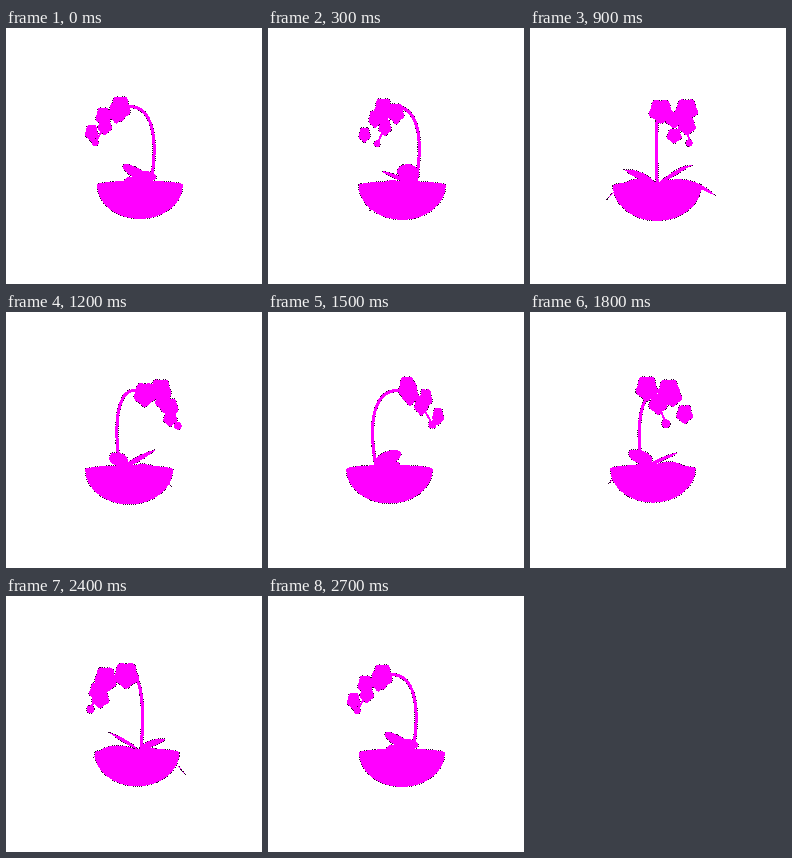
Recreate the animation shown at these times as an HTML page. Size 256 px wide and 256 px high, loop 3 s.

```html
<!DOCTYPE html>
<html lang="en">
<head>
<meta charset="utf-8">
<title>Turning orchid</title>
<style>
html, body { margin: 0; width: 100%; height: 100%; overflow: hidden; background: #fff; }
svg { display: block; width: 100vw; height: 100vh; shape-rendering: crispEdges; }
#edge { fill: none; stroke: #303; stroke-width: 1; stroke-dasharray: 1 1; }
#body { fill: #f0f; }
.stem { fill: none; stroke: #f0f; stroke-width: 3; }
.twig { fill: none; stroke: #f0f; stroke-width: 2; }
#edge .stem { stroke: #303; stroke-width: 3.6; }
</style>
</head>
<body>
<svg viewBox="0 0 256 256"><g id="edge"></g><g id="body"></g></svg>
<script>
const STEP = 300, STEPS = 10, TURN = 40, PHASE = -22;
const MID = 128, EYE = 300;

// Points are [along the arch, sideways, down] from the middle of the stage.
const stemCurve = [[20, 2, 26], [30, 2, -30], [17, 2, -56], [-12, 1, -48]];
const blossoms = [
  { at: [-14, 1, -47], size: 12 },
  { at: [-9, 28, -47], size: 11 },
  { at: [-28, 14, -40], size: 9 },
  { at: [-22, 28, -32], size: 9 },
  { at: [-40, 13, -23], size: 8 }
];
const bud = [-32, 30, -14];
const leaves = [
  { tip: [2, -34, 14], wide: 14 },
  { tip: [6, 34, 9], wide: 16 },
  { tip: [-5, -55, 46], wide: 8 },
  { tip: [10, 57, 38], wide: 8 }
];
const leafRoot = [10, 0, 27];

let cos, sin;

function project([r, s, h]) {
  const k = EYE / (EYE - r * sin + s * cos);
  return { x: MID + k * (r * cos + s * sin), y: MID + k * h, k };
}

function pt(p) {
  const { x, y } = project(p);
  return x.toFixed(2) + " " + y.toFixed(2);
}

const path = (d, cls = "") => `<path class="${cls}" d="${d}"/>`;

function bowl() {
  const { x, k } = project([6.5, 0, 0]);
  const w = 43.3 * k, left = x - w, right = x + w, rim = MID + 29 * k;
  return path(`M${left} ${rim}A${w} ${34.5 * k} 0 0 0 ${right} ${rim}A${w} ${4 * k} 0 0 0 ${left} ${rim}Z`);
}

function leaf({ tip: [r, s, h], wide }) {
  const side = m => [
    [leafRoot[0] + m * wide, s * 0.3, 22 + m * 3],
    [r + m * wide, s * 0.7, Math.min(h + 2, 24) + m * 3]
  ].map(pt);
  const [a, b] = side(-1), [c, d] = side(1);
  return path(`M${pt(leafRoot)}C${a},${b},${pt([r, s, h])}C${d},${c},${pt(leafRoot)}Z`);
}

// A five-lobed disc, narrower when it is seen from the side.
function blossom({ at, size }) {
  const { x, y, k } = project(at), flat = 0.65 + 0.35 * Math.abs(sin);
  const points = Array.from({ length: 30 }, (_, i) => {
    const a = i * Math.PI / 15, r = size * k * (1 - 0.1 * Math.cos(5 * a));
    return (x + r * flat * Math.sin(a)).toFixed(2) + "," + (y - r * Math.cos(a)).toFixed(2);
  });
  return `<polygon points="${points.join(" ")}"/>`;
}

function plant() {
  const [a, b, c, d] = stemCurve.map(pt), end = project(bud);
  return path(`M${a}C${b},${c},${d}`, "stem") +
    path(`M${pt(blossoms[3].at)}L${pt(bud)}`, "twig") +
    `<circle cx="${end.x}" cy="${end.y}" r="${3.7 * end.k}"/>` +
    bowl() + leaves.map(leaf).join("") + blossoms.map(blossom).join("");
}

const layers = ["edge", "body"].map(id => document.getElementById(id));
const start = performance.now();
let shown = -1;

function tick() {
  const step = Math.floor((performance.now() - start) / STEP) % STEPS;
  if (step !== shown) {
    const angle = (PHASE + TURN * step) * Math.PI / 180;
    cos = Math.cos(angle);
    sin = Math.sin(angle);
    const art = plant();
    layers.forEach(g => { g.innerHTML = art; });
    shown = step;
  }
  requestAnimationFrame(tick);
}
tick();
</script>
</body>
</html>
```
